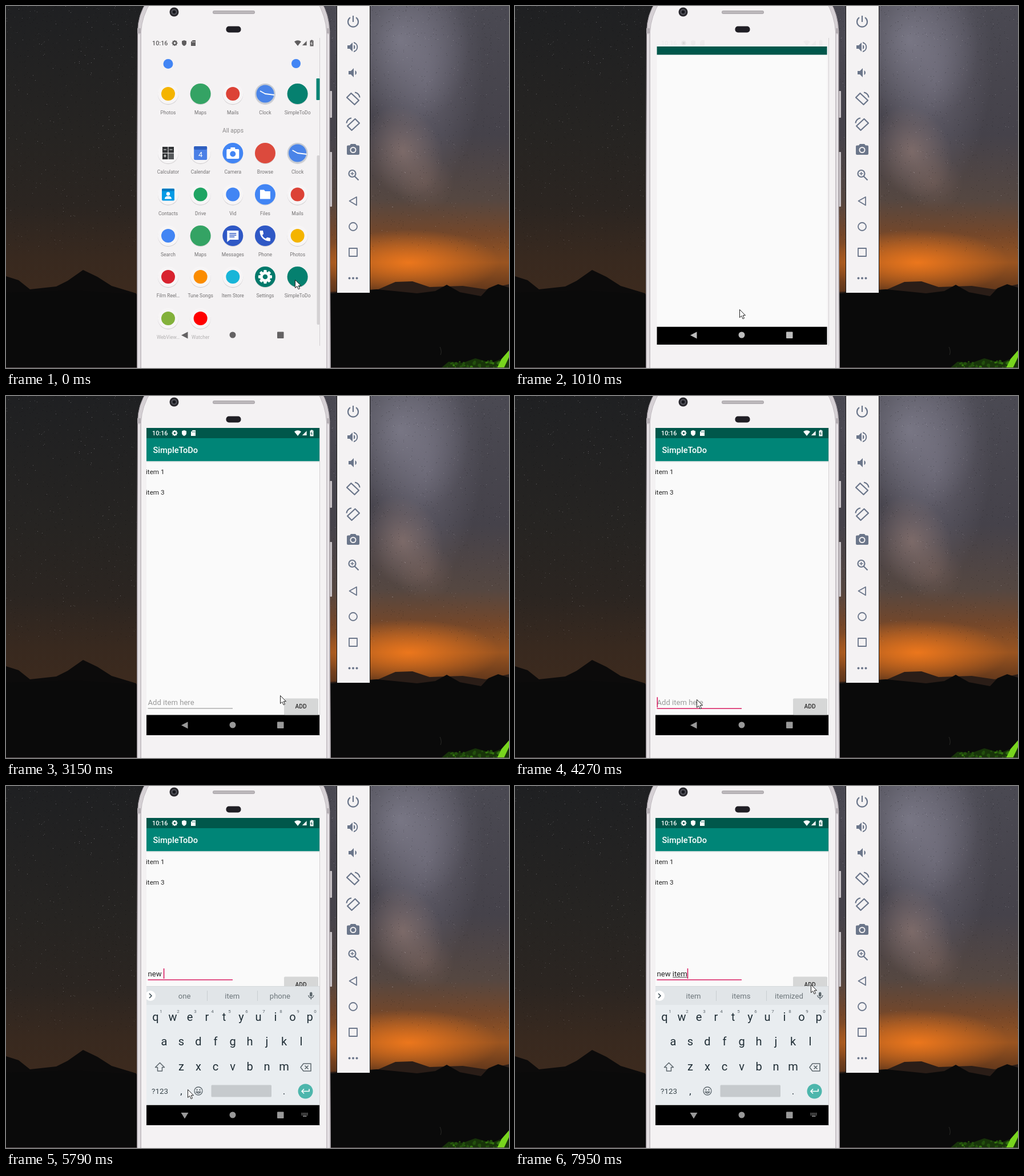
An HTML page with a canvas that plays this animation: 881 by 635 pixels, repeating every 8 s.

```html
<!DOCTYPE html>
<html lang="en">
<head>
<meta charset="utf-8">
<title>To-do app demo</title>
<style>
html, body { margin: 0; width: 100%; height: 100%; overflow: hidden; background: #0a0a0a; }
canvas { display: block; }
</style>
</head>
<body>
<canvas id="stage" width="881" height="635"></canvas>
<script>
const stage = document.getElementById('stage');
const LOOP = 8000, SLATE = '#6b768a', BODY = '#f4f2f3', PINK = '#d81b60';
let g = stage.getContext('2d');

// ---------- helpers ----------
const clamp = v => Math.max(0, Math.min(1, v));
const lerp = (a, b, u) => a + (b - a) * u;

function rect(x, y, w, h, color, r = 0) {
  g.fillStyle = color;
  g.beginPath();
  g.roundRect(x, y, w, h, r);
  g.fill();
}
function disc(x, y, r, color) {
  g.fillStyle = color;
  g.beginPath();
  g.arc(x, y, r, 0, 7);
  g.fill();
}
function text(s, x, y, size, color, align = 'center', weight = 400) {
  g.font = `${weight} ${size}px Roboto, sans-serif`;
  g.textAlign = align;
  g.fillStyle = color;
  g.fillText(s, x, y);
}
// Draws a path with its own origin at x, y; a line width makes it a stroke.
function shape(d, x, y, color, line = 0, sx = 1, sy = Math.abs(sx)) {
  g.save();
  g.translate(x, y);
  g.scale(sx, sy);
  const p = new Path2D(d);
  g.fillStyle = g.strokeStyle = color;
  g.lineWidth = line;
  g.lineJoin = 'round';
  line ? g.stroke(p) : g.fill(p);
  g.restore();
}
function poly(points, color) {
  shape('M' + points.join('L') + 'z', 0, 0, color);
}
function gear(x, y, r, color, hole) {
  g.save();
  g.translate(x, y);
  for (let i = 0; i < 8; i++) {
    rect(-r * .22, -r, r * .44, r, color, r * .1);
    g.rotate(Math.PI / 4);
  }
  g.restore();
  disc(x, y, r * .76, color);
  disc(x, y, r * .36, hole);
}
function layer(paint) {
  const c = document.createElement('canvas'), main = g;
  c.width = 881;
  c.height = 635;
  g = c.getContext('2d');
  paint();
  g = main;
  return c;
}

// ---------- scenery and device ----------
function sky(x, w, stops) {
  const fill = g.createLinearGradient(0, 0, 0, 500);
  stops.forEach(([at, c]) => fill.addColorStop(at, c));
  rect(x, 0, w, 510, fill);
}
function glow(x, y, r, sx, sy, angle, rgb, alpha) {
  g.save();
  g.translate(x, y);
  g.rotate(angle);
  g.scale(sx, sy);
  const fill = g.createRadialGradient(0, 0, 0, 0, 0, r);
  fill.addColorStop(0, `rgba(${rgb},${alpha})`);
  fill.addColorStop(1, `rgba(${rgb},0)`);
  disc(0, 0, r, fill);
  g.restore();
}
function scenery() {
  sky(0, 400, [[0, '#1f2022'], [.45, '#262422'], [.7, '#2b2521'], [.88, '#38291f'], [1, '#3c2a1e']]);
  g.save();
  g.beginPath();
  g.rect(400, 0, 481, 510);
  g.clip();
  sky(400, 481, [[0, '#4a4952'], [.45, '#45424a'], [.68, '#554741'], [.8, '#74472a'], [.9, '#9a5420'], [1, '#5f361b']]);
  glow(735, 130, 100, 1, 2.2, .1, '140,136,155', .4);
  glow(690, 60, 100, 1.2, 1.5, -.2, '150,148,165', .55);
  glow(695, 255, 75, .9, 1.1, -.4, '165,135,125', .5);
  glow(735, 310, 50, 1, 1, 0, '140,110,100', .3);
  glow(705, 450, 100, 1.6, .58, 0, '244,122,28', .9);
  g.restore();

  let seed = 11;
  const rnd = () => (seed = seed * 16807 % 2147483647) / 2147483647;
  for (let i = 0; i < 5000; i++) {
    const x = rnd() * 881, y = rnd() ** 1.3 * 430;
    rect(x | 0, y | 0, 1, 1, i % 2 ? `rgba(215,210,215,${rnd() ** 3 * .4})` : 'rgba(0,0,0,.25)');
  }

  poly([[0, 474], [22, 481], [42, 497], [88, 492], [108, 482], [135, 463], [160, 475], [185, 491], [228, 504], [240, 635], [0, 635]], '#0c0b0b');
  poly([[560, 502], [652, 497], [682, 484], [712, 483], [742, 493], [800, 491], [840, 497], [881, 488], [881, 635], [560, 635]], '#2a1d17');
  poly([[0, 503], [120, 499], [235, 506], [560, 505], [650, 497], [720, 504], [752, 500], [772, 489], [795, 502], [832, 509], [845, 495], [862, 488], [881, 494], [881, 635], [0, 635]], '#0a0a0a');
  poly([[762, 635], [775, 624], [800, 626], [822, 618], [850, 626], [881, 614], [881, 635]], '#173309');
  for (let i = 0; i < 40; i++) disc(770 + rnd() * 108, 623 + rnd() * 11, 1 + rnd() * 2, i % 3 ? '#23500d' : '#347510');
  poly([[860, 635], [868, 619], [881, 604], [881, 616], [872, 635]], '#78d51e');
  shape('M760 598q4 8 1 14', 0, 0, '#2b2b28', 1);
  rect(0, 634, 881, 1, '#594f52');
}
function phone() {
  rect(567, 149, 4, 47, '#c7c2c6', 1);
  rect(567, 256, 4, 96, '#c7c2c6', 1);
  const shell = 'M229.5 640V332L230.5 45Q231 14 247 -8H552Q566 14 567 45V332L568.5 640z';
  const face = 'M236.5 640V45Q238 18 254 -8H545Q560 18 561.5 45V640z';
  shape(shell, 0, 0, '#d5d0d4');
  shape(shell, 0, 0, '#8f888e', 1);
  shape('M233 640V50M564.5 640V50', 0, 0, '#f3eff2', 1.5);
  rect(230, 39, 6, 9, '#b5afb4');
  rect(562, 39, 5, 9, '#b5afb4');
  shape(face, 0, 0, BODY);
  shape(face, 0, 0, '#c0babf', 1);
  disc(294.5, 10.5, 8, '#29282d');
  disc(294.5, 10.5, 5, '#55555d');
  disc(294.5, 10.5, 3, '#17171d');
  rect(362, 8, 74, 6, '#a9a5a9', 3);
  rect(363, 9, 72, 4, '#bcb8bb', 2);
  rect(385.5, 35.5, 26, 11, '#201f25', 5);
  rect(549, 56, 1, 540, '#d3d0d2');
}
function toolbar() {
  rect(579, 0, 59, 504, '#151515');
  rect(580, 0, 57, 503, BODY);
  const icon = (d, y, line, sx) => shape(d, 608, y, SLATE, line, sx);
  icon('M0-10V1M-5-6.8A9 9 0 1 0 5-6.8', 27, 2.2);
  icon('M-10-3V3H-6L-1 8V-8L-6-3zM3.5 0C3.5-2 2.5-3.3 1-4V4C2.5 3.3 3.5 2 3.5 0zM1-9V-6.8A7 7 0 0 1 1 6.8V9A9.2 9.2 0 0 0 1-9z', 72);
  icon('M-8-3V3H-4L1 8V-8L-4-3zM6 0C6-2 5-3.3 3.5-4V4C5 3.3 6 2 6 0z', 117);
  const turn = 'M-11-1.5-3.5-9 10 3.5 2.5 11zM3-10.5A10 10 0 0 1 11.5-1.5';
  icon(turn, 162, 2.2);
  icon(turn, 207, 2.2, -1);
  icon('M-4-10-6-7.5H-9Q-11-7.5-11-5.5V7Q-11 9-9 9H9Q11 9 11 7V-5.5Q11-7.5 9-7.5H6L4-10z', 252);
  disc(608, 252.5, 5.5, BODY);
  disc(608, 252.5, 3.6, SLATE);
  icon('M4.5-3A6 6 0 1 1-7.5-3A6 6 0 1 1 4.5-3M3 2 9.5 8.5', 297, 2.2);
  icon('M-4.5-3H1.5M-1.5-6V0', 297, 1.5);
  icon('M-6.5 0 6-7V7.5z', 342, 1.8);
  icon('M7 0A7 7 0 1 1-7 0A7 7 0 1 1 7 0', 387, 1.8);
  icon('M-7-7H7V7H-7z', 432, 1.8);
  for (const x of [601.5, 608, 614.5]) disc(x, 477.5, 2, SLATE);
}

// ---------- launcher ----------
const plain = color => (x, y) => disc(x, y, 12, color);
const pictures = {
  clock(x, y) {
    disc(x, y, 18, '#c5cad2');
    disc(x, y, 15.5, '#4a84e8');
    shape('M-9-5 0 0 16 2', x, y, '#fff', 1.8);
  },
  calculator(x, y) {
    for (let i = 0; i < 4; i++) rect(x - 10 + i % 2 * 10.5, y - 11 + (i >> 1) * 11.5, 9.5, 10.5, i === 3 ? '#55585a' : '#303234');
    shape('M-8-6H-3M2.5-6H7.5M-8 5H-3M-5.5 2.5V7.5', x, y, '#fff', 1);
  },
  calendar(x, y) {
    rect(x - 11.5, y - 12, 23, 24, '#4b80e6', 2);
    rect(x - 11.5, y - 12, 23, 6, '#2f5fbf', 2);
    text('4', x, y + 7, 13, '#fff');
  },
  camera(x, y) {
    disc(x, y, 18, '#4285f4');
    rect(x - 4, y - 10, 8, 5, '#fff', 1);
    rect(x - 11, y - 7, 22, 17, '#fff', 2);
    disc(x, y + 1.5, 5, '#4285f4');
  },
  contacts(x, y) {
    rect(x - 11, y - 10, 22, 21, '#039be5', 2);
    rect(x - 11, y - 10, 22, 4, '#0277bd', 1);
    disc(x, y - 1, 3.2, '#fff');
    shape('M-6 8Q-6 3 0 3T6 8z', x, y, '#fff');
  },
  files(x, y) {
    disc(x, y, 18, '#4285f4');
    shape('M-9-8H-2L0-5.5H9V8H-9z', x, y, '#fff');
  },
  messages(x, y) {
    disc(x, y, 18, '#2f58c5');
    shape('M-10-9H10V7H-5L-10 11z', x, y, '#fff');
    shape('M-6-4H6M-6-1H6M-6 2H3', x, y, '#2f58c5', 1.5);
  },
  phone(x, y) {
    disc(x, y, 18, '#2f58c5');
    shape('M-5-1C-4 2-2 4 1 5L3.5 2.8 9 4V8.5Q9 9.5 8 9.5C-2 9.5-9.5 2-9.5-8Q-9.5-9-8.5-9H-4L-2.8-3.3z', x, y, '#fff');
  },
  settings(x, y) {
    disc(x, y, 18, '#00796b');
    gear(x, y, 12, '#fff', '#00796b');
  },
  maps(x, y) { disc(x, y, 18, '#34a364'); },
  browser(x, y) { disc(x, y, 18, '#dc4a3d'); },
  todo(x, y) { disc(x, y, 18, '#05806f'); },
  photos: plain('#f4b400'),
  mail: plain('#dc4236'),
  drive: plain('#1fa463'),
  video: plain('#4285f4'),
  search: plain('#4285f4'),
  movies: plain('#d8232f'),
  music: plain('#fb8c00'),
  store: plain('#18b5d8'),
  web: plain('#83b13b'),
  watch: plain('#f00')
};
const rows = [
  [154, 'Photos photos,Maps maps,Mails mail,Clock clock,SimpleToDo todo'],
  [258, 'Calculator calculator,Calendar calendar,Camera camera,Browse browser,Clock clock'],
  [330.5, 'Contacts contacts,Drive drive,Vid video,Files files,Mails mail'],
  [403, 'Search search,Maps maps,Messages messages,Phone phone,Photos photos'],
  [475, 'Film Reel… movies,Tune Songs music,Item Store store,Settings settings,SimpleToDo todo'],
  [548, 'WebView… web,Watcher watch']
];
function launcher() {
  disc(284, 101.5, 8.5, '#4285f4');
  disc(508, 101, 8, '#4285f4');
  for (const [y, list] of rows) list.split(',').forEach((entry, i) => {
    const x = 284 + i * 56.65, cut = entry.lastIndexOf(' ');
    disc(x, y + 1.2, 18, '#d2cfd1');
    disc(x, y, 18, '#f7f5f6');
    pictures[entry.slice(cut + 1)](x, y);
    text(entry.slice(0, cut), x, y + 36, 8.5, y > 540 ? '#b3b1b2' : '#757374');
  });
  text('All apps', 397.5, 222, 10.4, '#8b898a');
  rect(544.5, 262, 5, 297, '#d4d1d3', 2);
  rect(543.5, 127, 6, 38, '#0b8474', 1);
}

// ---------- system bars ----------
function statusIcons(color, hole) {
  text('10:16', 256, 69, 10.8, color, 'left', 500);
  gear(295.5, 65, 5, color, hole);
  shape('M0-5 4-3.4V0Q4 3.5 0 5Q-4 3.5-4 0V-3.4z', 312, 65, color);
  shape('M-1-5H4V5H-4V-2z', 328, 65, color);
  shape('M-1.5-3V-1M.5-3V-1M2.5-3V-1', 328, 65, hole, .8);
  shape('M-6-2.5Q0-7 6-2.5L0 5z', 511, 65, color);
  shape('M-4.5 4.5H4.5V-4.5z', 522.5, 65, color);
  shape('M-4.5 4.5H4.5V-4.5z', 522.5, 65, hole, .8);
  shape('M-1.2-5.5H1.2V-4.5H3V5.5H-3V-4.5H-1.2z', 535.5, 65, color);
  shape('M.8-2.5-1.4 1H1L-.5 3.5', 535.5, 65, hole, 1);
}
function navIcons(color, typing) {
  shape(typing ? 'M-6.5-4.5H6.5L0 6z' : 'M-6 0 5.5-6V6z', 313, 577.5, color);
  disc(397, 577, 5.5, color);
  rect(475, 571.5, 11.5, 11.5, color, 1);
  if (!typing) return;
  for (let i = 0; i < 10; i++) rect(517.5 + i % 5 * 2.4, 573.5 + (i / 5 | 0) * 2.4, 1.5, 1.5, color);
  rect(520, 578.5, 6.5, 1.5, color);
}

// ---------- app ----------
const FIELD = 'new item';
const typedAt = [5370, 5510, 5650, 5790, 6200, 6380, 6570, 6750];
const guesses = ['no n not', 'need ne never', 'new news newest', 'one item phone', 'I is in', 'it is its', 'item ite items', 'item items itemized'].map(s => s.split(' '));

function appWindow() {
  rect(246, 56, 303, 539, '#fafafa');
  rect(246, 56, 303, 18, '#00574b');
  rect(246, 559.5, 303, 35.5, '#000');
}
function content(t, typing) {
  rect(246, 74, 303, 40.5, '#008577');
  rect(246, 114.5, 303, 1, '#d2d5d5');
  rect(246, 115.5, 303, 1, '#eef0f0');
  text('SimpleToDo', 257.5, 100, 14.6, '#fff', 'left', 500);
  text('item 1', 245, 137, 11.7, '#262626', 'left');
  text('item 3', 245, 172.5, 11.7, '#262626', 'left');

  const base = typing ? 333.5 : 541.8;
  const count = typedAt.filter(at => at <= t).length;
  const typed = FIELD.slice(0, count);
  text(typed || 'Add item here', 248.5, base, 13.1, typed ? '#222' : '#9b9b9b', 'left');
  const end = 249 + g.measureText(typed).width * (count > 0);
  if (count && count !== 4) {
    const from = count > 4 ? 249 + g.measureText('new ').width : 249;
    rect(from, base + 1.5, end - from, 1, '#555');
  }
  const focused = t >= 4150;
  rect(248.5, base + 5.7, 148.5, focused ? 1.5 : 1, focused ? PINK : '#8a8a8a');
  const blinkOff = t < 4270 || t >= 4810 && t < 5370 || t >= 7130 && t < 7680;
  if (!blinkOff) rect(end - .5, base - 13.5, 1.6, 18, PINK);

  const top = typing ? 334.5 : 530.5;
  rect(487, top + 1, 60, 28, '#c2c3c3', 2);
  rect(487, top, 60, 28, '#d6d7d7', 2);
  text('ADD', 516.5, top + 17.5, 10.2, '#2e2e2e', 'center', 500);
  return count;
}
function keyboard(count) {
  const ink = '#1f2d35', soft = '#5d676d';
  rect(246, 351, 303, 1, '#d5d9dc');
  rect(246, 352, 303, 208, '#e9edf0');
  rect(246, 352, 303, 32, '#e1e5e8');
  disc(253, 368, 9, '#fff');
  shape('M-2-4 2 0-2 4', 253, 368, '#37474f', 1.6);
  if (count) {
    guesses[count - 1].forEach((word, i) => text(word, 312.5 + i * 83.7, 372.7, 13.1, '#6d767b'));
    rect(352, 359, 1, 18, '#c9ced1');
    rect(440, 359, 1, 18, '#c9ced1');
  } else text('Suggest contacts? Tap for info.', 396, 372.5, 11.8, '#3fb5a4');
  rect(532, 361.5, 4.5, 8, soft, 2.2);
  shape('M-4.5-1A4.5 4.5 0 0 0 4.5-1M0 3.5V6.5', 534.3, 368, soft, 1.4);

  [['qwertyuiop', 262, 412], ['asdfghjkl', 277, 455], ['zxcvbnm', 307, 499]].forEach(([keys, x, y], row) => {
    [...keys].forEach((key, i) => {
      text(key, x + i * 30, y, 20, ink);
      if (!row) text((i + 1) % 10, x + 9.5 + i * 30, 397.5, 8, soft);
    });
  });
  shape('M0-7.5 8 .5H4V7H-4V.5H-8z', 269.5, 493, soft, 1.5);
  shape('M-9 0-4-6.5H9V6.5H-4zM-1.5-3 4.5 3M4.5-3-1.5 3', 525, 493.5, soft, 1.5);
  text('?123', 269.5, 539.5, 13.4, '#3b474d');
  text(',', 307, 541, 17, ink);
  text('.', 487, 541, 17, ink);
  shape('M7 0A7 7 0 1 1-7 0A7 7 0 1 1 7 0M-4 1.5Q0 6.5 4 1.5z', 337, 535, soft, 1.3);
  disc(334.5, 533, 1.2, soft);
  disc(339.5, 533, 1.2, soft);
  rect(359.5, 524.5, 105.5, 21, '#c6cacd', 1.5);
  disc(524.5, 535.5, 13, '#4db6ac');
  shape('M6.5-4V0H-6M-2.5-4-6.5 0-2.5 4', 524.5, 535.5, '#fff', 1.7);
}

// ---------- pointer: start, end, steps, waypoints ----------
const moves = [
  [0, 0, 1, [[506, 480]]],
  [120, 120, 1, [[510, 477]]],
  [430, 1010, 5, [[506, 482], [450, 512], [393, 532]]],
  [1130, 1400, 3, [[378, 540], [340, 562]]],
  [1680, 2610, 8, [[325, 566], [308, 500], [360, 429], [450, 470], [491, 543]]],
  [2730, 2870, 2, [[491, 544], [491, 546]]],
  [3150, 4150, 8, [[480, 525], [420, 493], [350, 520], [318, 532]]],
  [7400, 7950, 5, [[345, 450], [425, 300], [470, 210], [505, 290], [518, 348]]]
];
function pointer(t) {
  const [from, to, steps, way] = moves.findLast(m => m[0] <= t);
  const last = Math.max(1, steps - 1);
  const done = to > from ? Math.min(1, Math.floor((t - from) / (to - from) * last + .001) / last) : 0;
  const at = done * (way.length - 1), i = Math.floor(at);
  const a = way[i], b = way[i + 1] || a;
  const x = lerp(a[0], b[0], at - i) + .5, y = lerp(a[1], b[1], at - i) + .5;
  const arrow = 'M0 0V14L3.3 11 5.6 16.3 8 15.2 5.7 10.2H10z';
  shape(arrow, x, y, '#fff');
  shape(arrow, x, y, '#222', 1);
}

// ---------- animation ----------
const backdrop = layer(() => { scenery(); phone(); toolbar(); });
const home = layer(launcher);

function screen(t) {
  const u = clamp((Math.floor((t - 730) / 133) + 1) / 4);
  const open = 1 - (1 - u) ** 2.25;
  if (open < 1) {
    g.globalAlpha = clamp(1 - 1.6 * open);
    g.drawImage(home, 0, 0);
    navIcons('#646263');
    g.globalAlpha = 1 - open;
    statusIcons('#5f5d5e', BODY);
    g.globalAlpha = 1;
    if (!open) return;
    // The new window grows out of the tapped icon, trimmed above and below.
    const s = lerp(.62, 1, open), half = 269.5 * s - 78 * (1 - open);
    const cx = lerp(510, 397.5, 1 - (1 - open) ** 3), cy = lerp(490, 325.5, open);
    const top = Math.round(cy - half), bottom = Math.round(cy + half);
    g.save();
    g.beginPath();
    g.rect(246, top, 303, bottom - top);
    g.clip();
    g.translate(cx, cy);
    g.scale(s, s);
    g.translate(-397.5, -325.5);
    appWindow();
    g.restore();
    navIcons('#bdbdbd');
    return;
  }
  const typing = t >= 4540;
  appWindow();
  if (t >= 2730) {
    const count = content(t, typing);
    if (typing) {
      const rising = t < 4690;
      g.save();
      g.beginPath();
      g.rect(246, 340, 303, 219.5);
      g.clip();
      g.translate(0, rising ? 50 : 0);
      g.globalAlpha = rising ? .7 : 1;
      keyboard(count);
      g.restore();
    }
  }
  statusIcons('#fff', '#00574b');
  navIcons('#999', typing);
}
function frame() {
  const t = performance.now() % LOOP;
  g.drawImage(backdrop, 0, 0);
  g.save();
  g.beginPath();
  g.rect(245, 56, 305, 539);
  g.clip();
  screen(t);
  g.restore();
  pointer(t);
  requestAnimationFrame(frame);
}
frame();
</script>
</body>
</html>
```
